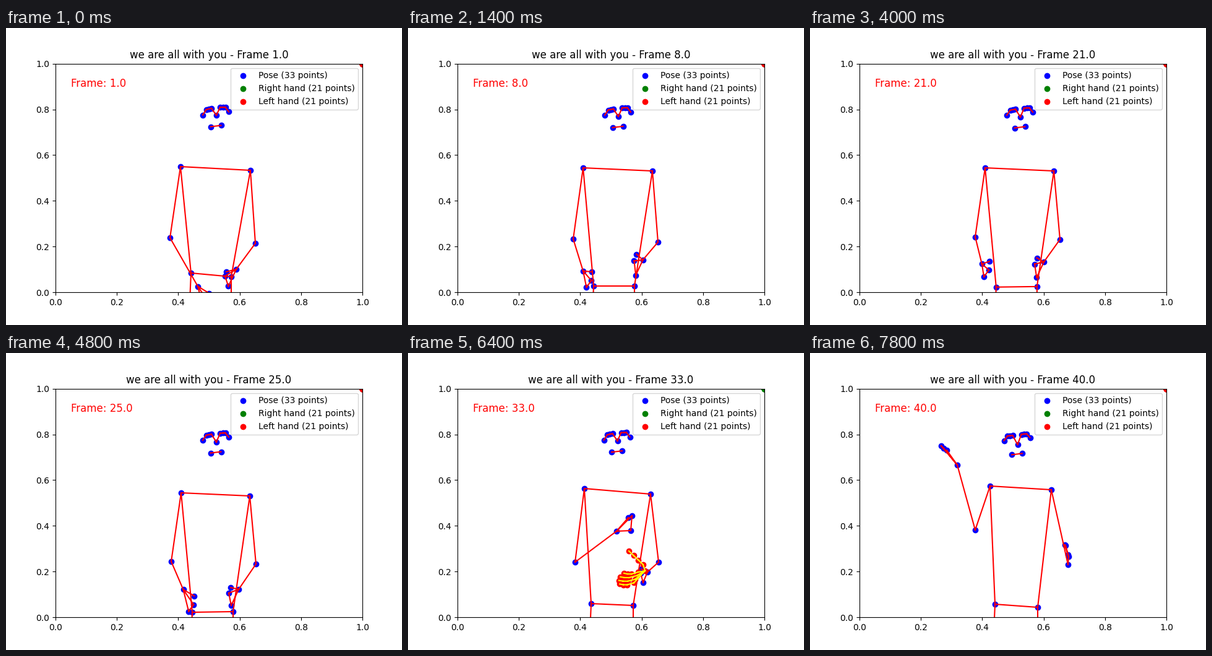
Recreate the animation shown at these times as a matplotlib script. Size 640 by 480 pixels, loop 8 s.

```python
import numpy as np
import matplotlib.pyplot as plt
from matplotlib.animation import FuncAnimation

N_FRAMES = 40

# Key poses in stage pixels: shoulders, elbows, wrists, hips (left, right)
START = np.array([(395, 230), (282, 224), (403, 348), (265, 339),
                  (376, 382), (305, 416), (364, 402), (299, 396)], float)
REST = np.array([(395, 231), (283, 226), (404, 346), (267, 341),
                 (376, 382), (284, 393), (366, 417), (300, 417)], float)
MEET = np.array([(392, 228), (285, 219), (405, 338), (270, 338),
                 (387, 354), (337, 288), (364, 408), (296, 405)], float)
WAVE = np.array([(390, 221), (291, 215), (417, 342), (267, 286),
                 (418, 329), (238, 181), (368, 411), (299, 406)], float)
LIFTED = REST - [(1, 0), (0, 0), (0, 5), (0, 4),
                 (0, 0), (2, 12), (-1, -1), (-1, -2)]
BEATS = [1, 8, 25, 33, 40]
POSES = [START, REST, LIFTED, MEET, WAVE]

# Little finger, index and thumb as seen from each wrist (left, right)
LOOSE = np.array([[(-12, 26), (-16, 6), (-13, -3)],
                  [(6, 28), (14, 17), (15, 3)]], float)
FOLDED = np.array([[(-7, 17), (-11, 2), (-10, -5)],
                   [(23, -1), (25, -25), (19, -22)]], float)
RAISED = np.array([[(-1, -3), (-6, -19), (-5, -18)],
                   [(-26, -31), (-22, -27), (-17, -24)]], float)
GRIPS = [LOOSE, LOOSE, LOOSE, FOLDED, RAISED]

# Small hand swings while the arms hang, and the nod of the head
SWAY_KEYS = [1, 8, 14, 21, 25, 33]
LEFT_SWAY = [1, -.9, .1, -.5, 0, 0]
RIGHT_SWAY = [1, -.2, .9, -.9, .9, 0]
NOD_KEYS = [1, 8, 25, 33, 40]
NOD_X = [0, 0, 0, -1.5, -4.5]
NOD_Y = [0, 2, 3, 1, 7]

# Half width, height and nod depth of mirrored face points
FACE_ROWS = [(7, 129, .5), (11.5, 129.5, .4), (15.5, 130, .35),
             (21, 138, .15), (8.5, 158.5, .7)]
TILT = 0.12

POSE_LINKS = [(0, 1), (1, 2), (2, 3), (3, 7), (0, 4), (4, 5), (5, 6), (6, 8),
              (9, 10), (11, 12), (23, 24)]
for s in (0, 1):
    POSE_LINKS += [(a + s, b + s) for a, b in
                   [(11, 13), (13, 15), (15, 17), (15, 19), (15, 21),
                    (17, 19), (11, 23), (23, 25)]]
HAND_LINKS = [(0 if j == 0 else k + j - 1, k + j)
              for k in range(1, 21, 4) for j in range(4)]
HAND_SEEN = range(33, 36)
CORNER = np.ones((21, 2))


def ease(num, keys, values):
    """Smooth step between the values at the keys."""
    i = np.clip(np.searchsorted(keys, num, side="right") - 1, 0, len(keys) - 2)
    u = np.clip((num - keys[i]) / (keys[i + 1] - keys[i]), 0, 1)
    return values[i] + (values[i + 1] - values[i]) * u * u * (3 - 2 * u)


def to_data(px):
    return (np.asarray(px) - (80, 427.2)) / (496, -369.6)


def face_at(num):
    dx, dy = ease(num, NOD_KEYS, NOD_X), ease(num, NOD_KEYS, NOD_Y)

    def row(side, width, y, depth):
        return (339 + dx + side * width, y + depth * dy - side * TILT * width)

    eyes = [row(side, *r) for side in (1, -1) for r in FACE_ROWS[:3]]
    rest = [row(side, *r) for r in FACE_ROWS[3:] for side in (1, -1)]
    return [(340 + dx, 141 + dy)] + eyes + rest


def pose_at(num):
    body = ease(num, BEATS, POSES)
    grip = ease(num, BEATS, GRIPS)
    left = ease(num, SWAY_KEYS, LEFT_SWAY)
    right = ease(num, SWAY_KEYS, RIGHT_SWAY)
    body[4] += left * np.array([-4, 8])
    body[5] += right * np.array([5, 1.5])
    grip[0] += left * np.outer([.2, .7, 1], [-3, 7])
    grip[1] += right * np.array([3, 8])
    pts = np.zeros((27, 2))
    pts[:11] = face_at(num)
    pts[11:17] = body[:6]
    for s in (0, 1):
        pts[17 + s:23:2] = body[4 + s] + grip[s]
    pts[23:25] = body[6:]
    pts[25:] = body[6:] + [(0, 160), (-7, 160)]
    return pts


def hand_shape():
    """Left hand in pixels from the pose wrist: wrist, thumb, four fingers."""
    pts = [(-4, -2), *np.linspace((-7, -12), (-30, -34), 4)]
    for f in range(4):
        reach = 27 - 1.8 * (f - 1.5) ** 2
        for r in (0, .47, .75, 1):
            pts.append((-15 - 2.3 * f - reach * r,
                        5.8 * f + 2 * r + 2.3 * np.sin(np.pi * r)))
    return np.array(pts)


def chain(pts, links):
    """Join the links into one broken line."""
    gap = (np.nan, np.nan)
    return np.array([p for a, b in links for p in (pts[a], pts[b], gap)]).T


HAND = hand_shape()
fig, ax = plt.subplots(figsize=(6.4, 4.8), dpi=100)
ax.set_xlim(0, 1)
ax.set_ylim(0, 1)
pose_dots = ax.scatter([], [], c="blue", label="Pose (33 points)")
right_dots = ax.scatter([], [], c="green", label="Right hand (21 points)")
left_dots = ax.scatter([], [], c="red", label="Left hand (21 points)")
pose_line, = ax.plot([], [], color="red")
hand_line, = ax.plot([], [], color="yellow")
title = ax.set_title("")
counter = ax.text(0.05, 0.9, "", color="red", fontsize=12)
ax.legend(loc="upper right")


def update(i):
    num = i + 1
    px = pose_at(num)
    pose = to_data(px)
    pose_dots.set_offsets(pose)
    pose_line.set_data(*chain(pose, POSE_LINKS))
    right_dots.set_offsets(CORNER)
    seen = num in HAND_SEEN
    hand = to_data(px[15] + HAND) if seen else CORNER
    left_dots.set_offsets(hand)
    hand_line.set_data(*chain(hand, HAND_LINKS))
    hand_line.set_visible(seen)
    title.set_text(f"we are all with you - Frame {num:.1f}")
    counter.set_text(f"Frame: {num:.1f}")
    return pose_dots, right_dots, left_dots, pose_line, hand_line, title, counter


anim = FuncAnimation(fig, update, frames=N_FRAMES, interval=200,
                     init_func=lambda: update(0), repeat=True, repeat_delay=0)
plt.show()
```
